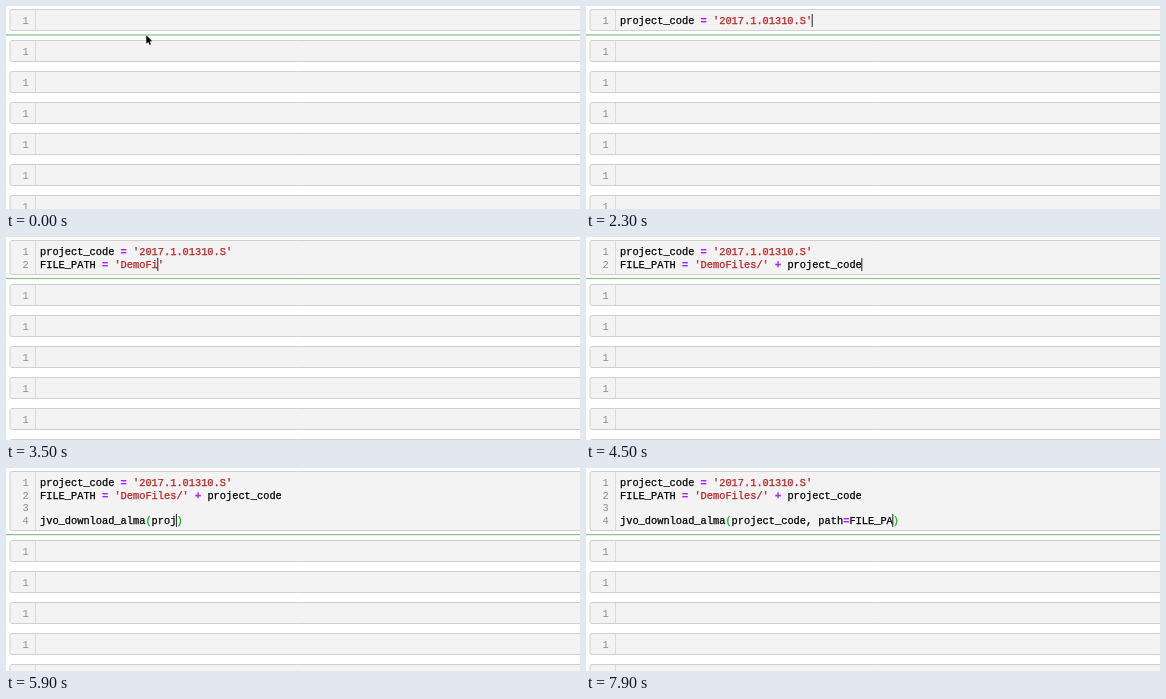
Animation of 574 by 203 pixels, one loop 8000 ms. Source, as an HTML page with a canvas:

```html
<!DOCTYPE html>
<html lang="en">
<head>
<meta charset="utf-8">
<title>Notebook typing</title>
<style>
html, body { margin: 0; width: 100%; height: 100%; overflow: hidden; background: #fff; }
canvas { display: block; }
</style>
</head>
<body>
<canvas id="stage" width="574" height="203"></canvas>
<script>
const ctx = document.getElementById('stage').getContext('2d');
const W = 574, H = 203, LOOP = 8000, STEP = 100;
const CHAR = 6.2, TEXT_X = 34, LINE = 12.55, BASE = 18;
const CELL_TOP = 34, CELL_PITCH = 31.1, CELL_HEIGHT = 22;
const FONT = '10.333px "Liberation Mono", "Courier New", monospace';
const FOCUS_TIME = 100;

// Each burst is typed evenly between its two times
const BURSTS = [
  { from: 200, to: 800, text: "project_code = '" },
  { from: 900, to: 1400, text: "2017." },
  { from: 1400, to: 2300, text: "1.01310.S'" },
  { from: 2400, to: 3500, text: "\nFILE_PATH = 'DemoFi" },
  { from: 3500, to: 4500, text: "les/' + project_code" },
  { from: 4500, to: 4700, text: "\n\n" },
  { from: 4700, to: 5100, text: "jvo_downlo" },
  { from: 5100, to: 5700, text: "ad_alma(" },
  { from: 5700, to: 6300, text: "project_code, " },
  { from: 6300, to: 6700, text: "path" },
  { from: 7100, to: 7900, text: "=FILE_PA" }
];

function typedAt(time) {
  const t = Math.floor(time / STEP) * STEP;
  return BURSTS.map(({ from, to, text }) => {
    const part = Math.min(1, Math.max(0, (t - from) / (to - from)));
    return text.slice(0, Math.floor(part * text.length + 1e-6));
  }).join('');
}

// The closing quote or bracket the editor adds by itself
function autoClose(line) {
  if (line.split("'").length % 2 === 0) return "'";
  return line.includes('(') ? ')' : '';
}

function styleOf(token) {
  if (token[0] === "'") return ['#ba2121', ''];
  if (/[=+]/.test(token)) return ['#aa22ff', 'bold '];
  if (/[()]/.test(token)) return ['#00bb00', ''];
  return ['#000', ''];
}

function drawText(text, x, y, color, weight = '') {
  ctx.font = weight + FONT;
  ctx.fillStyle = color;
  ctx.fillText(text, x, Math.round(y));
}

function drawCode(line, y) {
  for (const match of line.matchAll(/'[^']*'?|[=+()]|[^'=+()]+/g)) {
    const [color, weight] = styleOf(match[0]);
    const x = TEXT_X + match.index * CHAR;
    drawText(match[0], x, y, color, weight);
    // A hairline outline thickens the strokes a little
    ctx.strokeStyle = color;
    ctx.lineWidth = .25;
    ctx.strokeText(match[0], x, Math.round(y));
  }
}

function drawNumber(n, y) {
  drawText(n, 16.4, y, '#8c8c8c');
}

function drawCell(top, height) {
  const y = Math.round(top), h = Math.round(top + height) - y;
  ctx.beginPath();
  ctx.roundRect(4, y + .5, W + 10, h - 1, 2);
  ctx.fillStyle = '#f3f3f3';
  ctx.fill();
  ctx.lineWidth = 1;
  ctx.strokeStyle = '#cfcfcf';
  ctx.stroke();
  ctx.fillStyle = '#dadada';
  ctx.fillRect(29, y + 1, 1, h - 2);
}

function drawPointer(x, y) {
  ctx.save();
  ctx.translate(x, y);
  ctx.scale(.88, .88);
  ctx.beginPath();
  [[0, 0], [0, 9.6], [2.2, 7.6], [3.7, 11], [5.3, 10.3], [3.8, 7], [6.8, 6.8]]
    .forEach(point => ctx.lineTo(...point));
  ctx.closePath();
  ctx.lineWidth = 1;
  ctx.strokeStyle = '#fff';
  ctx.stroke();
  ctx.fillStyle = '#000';
  ctx.fill();
  ctx.restore();
}

function draw(time) {
  const lines = typedAt(time).split('\n');
  const last = lines.length - 1, column = lines[last].length;
  const shift = last * LINE;
  lines[last] += autoClose(lines[last]);

  ctx.fillStyle = '#fff';
  ctx.fillRect(0, 0, W, H);

  drawCell(3, CELL_HEIGHT + shift);
  lines.forEach((line, i) => {
    drawNumber(i + 1, BASE + i * LINE);
    drawCode(line, BASE + i * LINE);
  });
  ctx.fillStyle = '#86c68a';
  ctx.fillRect(0, 28.3 + shift, W, 1.3);

  for (let top = CELL_TOP + shift; top < H; top += CELL_PITCH) {
    drawCell(top, CELL_HEIGHT);
    drawNumber(1, top + 15);
  }

  if (time < FOCUS_TIME) {
    drawPointer(140.3, 29.3);
  } else {
    ctx.fillStyle = '#222';
    ctx.fillRect(33.5 + column * CHAR, Math.round(8 + shift), 1, 13);
  }
}

function frame() {
  draw(performance.now() % LOOP);
  requestAnimationFrame(frame);
}
frame();
</script>
</body>
</html>
```
